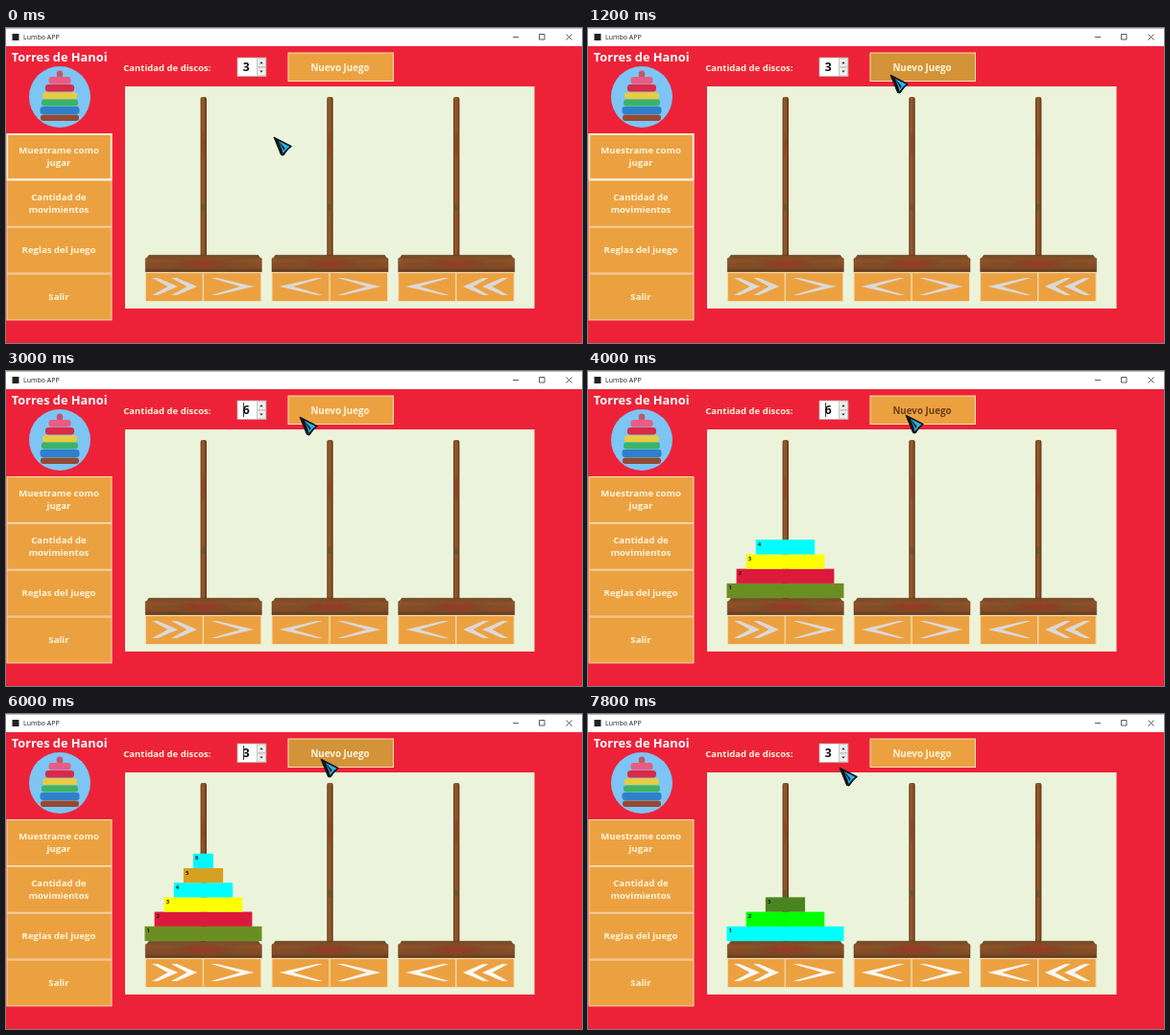
These frames come from a looping animation (600 px wide and 329 px high, 8000 ms). An HTML page:

```html
<!DOCTYPE html>
<html lang="es">
<head>
<meta charset="utf-8">
<title>Torres</title>
<style>
  html, body { margin: 0; width: 100%; height: 100%; overflow: hidden; background: #ed2238; }
  svg { display: block; width: 100vw; height: 100vh; }
  text { font-family: "Open Sans", "Noto Sans", sans-serif; }
  .label { font-weight: 700; font-size: 9.6px; fill: #fff6dc; }
  .button { fill: #eca141; stroke: #f7dfb4; stroke-width: 1; }
  .hover { fill: #d39338; }
  .num { font: 700 6px "Open Sans", sans-serif; fill: #181818; }
</style>
</head>
<body>
<svg viewBox="0 0 600 329" preserveAspectRatio="none">
  <defs>
    <linearGradient id="pole">
      <stop offset="0" stop-color="#653a1c"/>
      <stop offset=".35" stop-color="#985a2b"/>
      <stop offset=".65" stop-color="#8a5026"/>
      <stop offset="1" stop-color="#5c3319"/>
    </linearGradient>
    <linearGradient id="base" x2="0" y2="1">
      <stop offset="0" stop-color="#744722"/>
      <stop offset=".3" stop-color="#8f532a"/>
      <stop offset=".75" stop-color="#824a25"/>
      <stop offset="1" stop-color="#5e351a"/>
    </linearGradient>
    <radialGradient id="knot">
      <stop offset="0" stop-color="#a52c24" stop-opacity=".65"/>
      <stop offset=".55" stop-color="#8c3822" stop-opacity=".35"/>
      <stop offset="1" stop-color="#55602c" stop-opacity="0"/>
    </radialGradient>
  </defs>

  <rect width="600" height="329" fill="#ed2238"/>
  <rect width="600" height="19" fill="#fff"/>
  <path d="M0 .25H600" stroke="#555" stroke-width=".5"/>
  <rect x="6.5" y="6" width="7" height="7" fill="#222"/>
  <text x="18" y="12" font-size="7" fill="#222">Lumbo APP</text>
  <path d="M528 9.5h6M555.5 6.5h5.5v5.5h-5.5zM583.5 6.5l6 6m0-6l-6 6" fill="none" stroke="#333" stroke-width=".8"/>

  <text class="label" x="55.7" y="34.7" text-anchor="middle" style="font-size:12.8px;fill:#fff">Torres de Hanoi</text>
  <circle cx="56" cy="72" r="32" fill="#7cc5f5"/>
  <g id="toy"></g>
  <g id="menu"></g>

  <text class="label" x="122.3" y="45" style="font-size:9.5px">Cantidad de discos:</text>
  <rect x="241" y="31" width="30" height="19.5" fill="#fff" stroke="#b9b0a8" stroke-width=".7"/>
  <path d="M261.5 31.8h9v8.6h-9zM261.5 41.2h9v8.6h-9z" fill="#eee" stroke="#aaa" stroke-width=".6"/>
  <path d="M264.2 37.2l1.8-2.2 1.8 2.2zM264.2 44.4l1.8 2.2 1.8-2.2z" fill="#333"/>
  <text id="count" x="246.8" y="45.2" font-size="12.2" font-weight="700" fill="#111"></text>
  <path id="caret" d="M247.6 33V48" stroke="#222" stroke-width=".9"/>

  <rect id="play" class="button" x="294" y="26" width="109.5" height="29.5"/>
  <text id="playText" class="label" x="348" y="44.7" text-anchor="middle" style="font-size:9.8px">Nuevo Juego</text>

  <rect x="124" y="61" width="426.5" height="232" fill="#ebf4db"/>
  <g id="pegs"></g>
  <g id="discs"></g>

  <g id="cursor">
    <path d="M0 0L18.5 9.5L14.5 13L10 19L7.5 18.5Z" fill="#101318" stroke="#101318" stroke-linejoin="round"/>
    <path d="M5 4L16.5 9.8L13.5 12.2L9.5 17L8.5 13Z" fill="#29b4ec"/>
    <path d="M5 4L11.5 11.5L10.5 14Z" fill="#14181e"/>
  </g>
</svg>
<script>
const $ = id => document.getElementById(id);
const LOOP = 8000, STEP = 200;

// Stacking toy: half width, top, height, colour
$('toy').innerHTML = [
  [3.2, 44.5, 7.5, '#c4566a'], [11.5, 51, 7.5, '#ea5c84'], [15, 59, 7.5, '#d92a48'],
  [18, 67.3, 7, '#e9cb42'], [19, 74.5, 7, '#3cb368'], [20.5, 82, 8, '#2f80cc'],
  [20, 90.5, 6.5, '#954a33']
].map(([half, y, h, color]) =>
  `<rect x="${56 - half}" y="${y}" width="${2 * half}" height="${h}" rx="3" fill="${color}"/>`).join('');

$('menu').innerHTML = [
  ['Muestrame como', 'jugar'], ['Cantidad de', 'movimientos'], ['Reglas del juego'], ['Salir']
].map((lines, i) => {
  const y = 110.5 + i * 48.8;
  const text = lines.map((line, k) =>
    `<text class="label" x="55" y="${y + 27.3 + (k - (lines.length - 1) / 2) * 13}" text-anchor="middle">${line}</text>`);
  return `<rect class="button" x="1" y="${y}" width="109" height="48"/>${text.join('')}`;
}).join('') + '<rect id="focus" x="1.4" y="111" width="108.2" height="47" fill="none" stroke="#fff3dc" stroke-width="1.6"/>';

// Chevron pointing right (dir 1) or left (dir -1) around a centre
function chevron(cx, dir, width, inner) {
  const at = (x, y) => `${cx + dir * x} ${y}`, h = width / 2;
  return `<path class="arrow" d="M${at(-h, 261)}L${at(-h + 6, 261)}L${at(h, 270)}L${at(-h + 6, 279)}L${at(-h, 279)}L${at(inner, 270)}Z"/>`;
}
const single = (cx, dir) => chevron(cx, dir, 45, 8);
const double = (cx, dir) => chevron(cx - 10, dir, 27, 3) + chevron(cx + 10, dir, 27, 3);

// Wood grain fanning out from the middle of a base
function grain(x) {
  return [-1, 1].flatMap(side => [0, 1, 2, 3, 4].map(k =>
    `<path d="M${x + side * 8} ${244 + k}L${x + side * (58 - k * 3)} ${239 + k * 3.5}"
      stroke="${k % 2 ? '#a33a28' : '#4f5a2a'}" stroke-width="1.5" stroke-opacity=".35"/>`)).join('');
}

$('pegs').innerHTML = [
  [205.8, [double, 1], [single, 1]],
  [337.5, [single, -1], [single, 1]],
  [469.2, [single, -1], [double, -1]]
].map(([x, [left, leftDir], [right, rightDir]]) => `
  <rect x="${x - 3.2}" y="72" width="6.4" height="167" rx="2" fill="url(#pole)"/>
  <ellipse cx="${x}" cy="122" rx="3" ry="18" fill="url(#knot)"/>
  <rect x="${x - 2}" y="184" width="4" height="7" fill="#4d5830" opacity=".5"/>
  <path d="M${x - 57} 237.3h114q1 3 3.5 3.5v14h-121v-14q2.5-.5 3.5-3.5z" fill="url(#base)" stroke="#5a341b" stroke-width=".5"/>
  ${grain(x)}
  <ellipse cx="${x}" cy="246" rx="40" ry="8.5" fill="url(#knot)"/>
  <rect class="button" x="${x - 60.5}" y="255.5" width="60" height="30"/>
  <rect class="button" x="${x - .3}" y="255.5" width="60.3" height="30"/>
  ${left(x - 30.2, leftDir)}${right(x + 30.3, rightDir)}`).join('');
const arrows = document.querySelectorAll('.arrow');

const path = [
  [0, 279, 114], [1200, 315, 49], [1400, 315, 49], [2000, 251, 42], [2600, 251, 42],
  [3000, 306, 48], [3200, 331, 46], [4400, 331, 46], [4800, 280, 47], [5000, 253, 42],
  [5400, 253, 42], [6000, 328, 47], [7000, 328, 47], [7800, 262, 56], [LOOP, 262, 56]
];
const within = (t, from, to) => t >= from && t < to;

function cursorAt(t) {
  const i = path.findIndex((p, k) => k && t <= p[0]);
  const [t0, x0, y0] = path[i - 1], [t1, x1, y1] = path[i];
  const k = (t - t0) / (t1 - t0);
  return [x0 + (x1 - x0) * k, y0 + (y1 - y0) * k];
}

const sixColors = ['#6b8e23', '#dc1a3c', '#ffff00', '#00ffff', '#d6a120', '#00f8ff'];
const threeColors = ['#00ffff', '#00ff00', '#4a8420'];

function discs(total, shown, colors) {
  return colors.slice(0, shown).map((color, i) => {
    const inset = i * 60.6 / total, x = 144.5 + inset, y = 221.8 - i * 15.2;
    return `<rect x="${x}" y="${y}" width="${122 - 2 * inset}" height="15.3" fill="${color}"/>
      <text class="num" x="${x + 2}" y="${y + 6.5}">${i + 1}</text>`;
  }).join('');
}

function draw(t) {
  const second = t >= 6200;
  const shown = Math.max(0, Math.floor((t - (second ? 6200 : 3400)) / STEP) + 1);
  $('discs').innerHTML = second ? discs(3, shown, threeColors) : discs(6, shown, sixColors);

  const building = within(t, 3400, 4600) || within(t, 6200, 6800);
  const locked = t < 4600 || building;
  arrows.forEach(a => a.setAttribute('fill', locked ? '#dbd9d7' : '#fbf8f4'));

  const hover = within(t, 1000, 1800) || within(t, 3200, 3400) ||
    within(t, 5800, 6200) || within(t, 6800, 7200);
  $('play').setAttribute('class', hover ? 'button hover' : 'button');
  $('playText').style.fill = building ? '#6b3d18' : '#fff6dc';

  $('count').textContent = within(t, 2400, 5400) ? '6' : '3';
  $('caret').style.display = within(t, 2000, 6200) ? '' : 'none';
  $('focus').style.display = t < 2000 ? '' : 'none';
  $('cursor').setAttribute('transform', `translate(${cursorAt(t)})`);
}

const start = performance.now();
let last = -1;
function tick() {
  const elapsed = Math.max(0, performance.now() - start) % LOOP;
  const t = Math.floor(elapsed / STEP) * STEP;
  if (t !== last) draw(last = t);
  requestAnimationFrame(tick);
}
tick();
</script>
</body>
</html>
```
